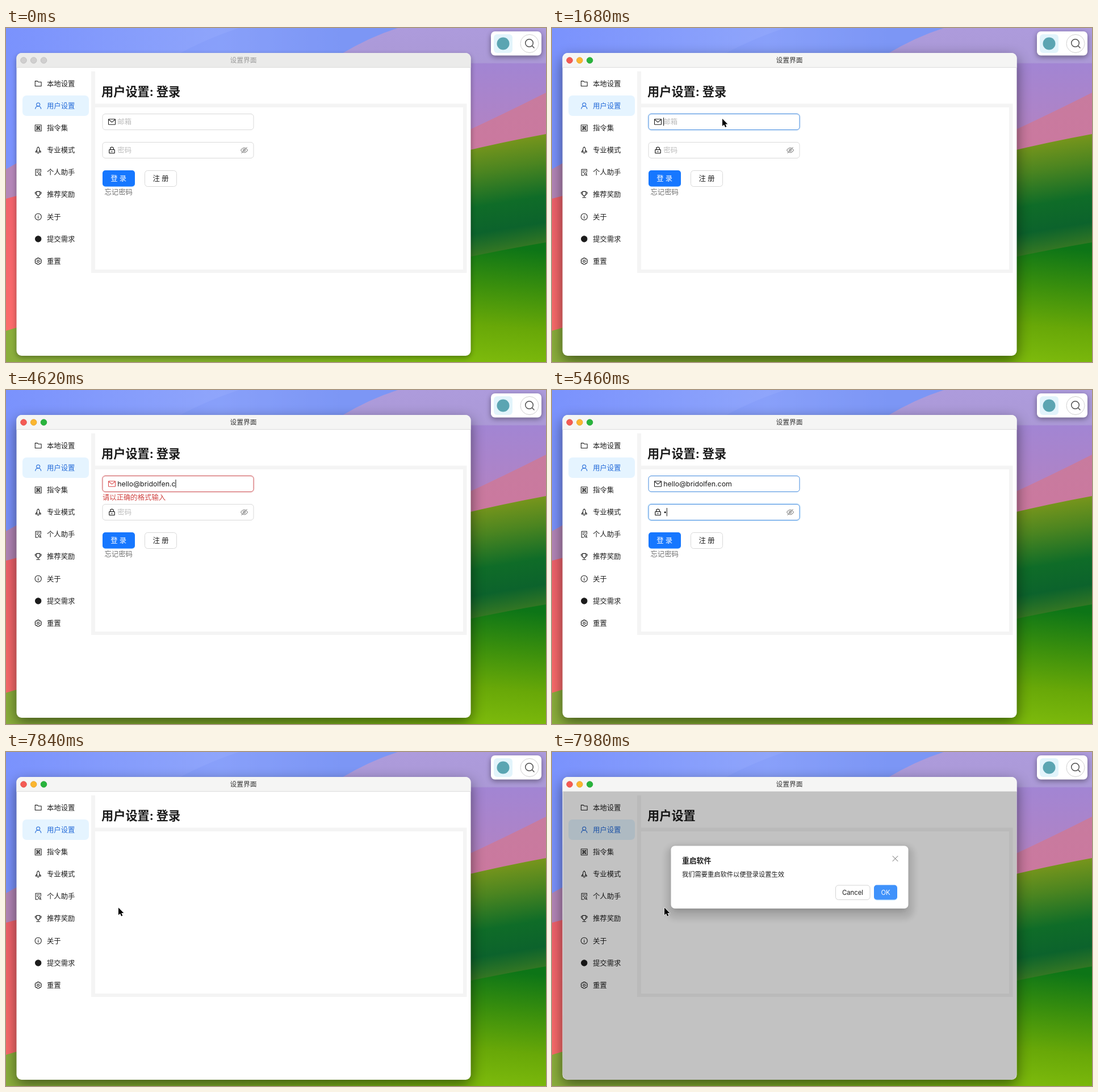
An HTML page for the animation above (8 s loop, 951 by 589 pixels).

```html
<!DOCTYPE html>
<html lang="zh-CN">
<head>
<meta charset="utf-8">
<title>用户设置</title>
<style>
html, body { margin: 0; width: 100%; height: 100%; overflow: hidden; background: #fff; }
svg { display: block; width: 100vw; height: 100vh; }
text { font: 12.35px Inter, "Noto Sans CJK SC", "Noto Sans CJK", sans-serif; fill: #1c1c1c; white-space: pre; }
.mid { text-anchor: middle; }
.line { fill: none; stroke: currentColor; stroke-width: 1.05; stroke-linecap: round; stroke-linejoin: round; }
.hint { fill: #bcbcbc; }
</style>
</head>
<body>
<svg id="stage" viewBox="0 0 951 589" preserveAspectRatio="none">
  <defs>
    <linearGradient id="sky"><stop offset="0" stop-color="#7a92fd"/><stop offset=".4" stop-color="#8fa5fb"/><stop offset=".62" stop-color="#7c96f4"/></linearGradient>
    <linearGradient id="mauve" x2="0" y2="1"><stop offset="0" stop-color="#ad9bdc"/><stop offset=".34" stop-color="#ab99d6"/><stop offset=".35" stop-color="#a285d3"/><stop offset="1" stop-color="#b183c4"/></linearGradient>
    <linearGradient id="pink" x2="0" y2="1"><stop offset="0" stop-color="#c87b9e"/><stop offset="1" stop-color="#cb789f"/></linearGradient>
    <linearGradient id="hill" gradientUnits="userSpaceOnUse" x1="868" y1="198" x2="900" y2="395"><stop offset="0" stop-color="#79961c"/><stop offset=".25" stop-color="#4c8520"/><stop offset=".55" stop-color="#0f6c28"/><stop offset=".78" stop-color="#0c632c"/><stop offset="1" stop-color="#3b7a22"/></linearGradient>
    <linearGradient id="grass" gradientUnits="userSpaceOnUse" x1="900" y1="388" x2="880" y2="589"><stop offset="0" stop-color="#0d7517"/><stop offset=".35" stop-color="#3a8f0d"/><stop offset=".7" stop-color="#68a808"/><stop offset="1" stop-color="#7cb90c"/></linearGradient>
    <linearGradient id="floor"><stop offset="0" stop-color="#8bae3c"/><stop offset=".5" stop-color="#7fae28"/><stop offset="1" stop-color="#7ab90c"/></linearGradient>
    <linearGradient id="coral" x2="0" y2="1"><stop offset="0" stop-color="#f0626c"/><stop offset="1" stop-color="#fb6c6b"/></linearGradient>
    <filter id="soft" x="-20%" y="-20%" width="140%" height="140%"><feGaussianBlur stdDeviation="5"/></filter>
    <filter id="wide" x="-20%" y="-20%" width="140%" height="140%"><feGaussianBlur stdDeviation="12"/></filter>
  </defs>

  <g id="wallpaper">
    <rect width="951" height="589" fill="url(#sky)"/>
    <path d="M300 48Q350 20 410 0H690L590 48Z" fill="#7b95f5" opacity=".35"/>
    <path d="M590 46Q640 16 690 0H951V180H590Z" fill="url(#mauve)"/>
    <path d="M800 187Q880 150 951 114V230H800Z" fill="url(#pink)"/>
    <path d="M800 219Q880 200 951 187V420H800Z" fill="url(#hill)"/>
    <path d="M800 407Q880 390 951 378V589H800Z" fill="url(#grass)"/>
    <path d="M0 249L30 232V310H0Z" fill="#b486b8"/>
    <path d="M0 301L30 293V540H0Z" fill="url(#coral)"/>
    <path d="M0 534L30 525V576H810V589H0Z" fill="url(#floor)"/>
  </g>

  <rect x="854" y="9" width="89" height="42" rx="7" opacity=".4" filter="url(#soft)"/>
  <rect x="854" y="6" width="89" height="42.5" rx="7" fill="#fff"/>
  <rect x="859" y="11" width="33" height="33" rx="6" fill="#e2f4fb"/>
  <circle cx="875.5" cy="27.5" r="11" fill="#5ba5b2"/>
  <circle cx="922" cy="27.5" r="16" fill="#fff" stroke="#cfcfcf"/>
  <g fill="none" stroke="#505050" stroke-width="1.5" stroke-linecap="round"><circle cx="921.5" cy="26.5" r="6.8"/><path d="M926.5 31.5L930 35"/></g>

  <rect id="dimShade" x="18.5" y="48" width="800" height="533" rx="9" opacity=".35" filter="url(#soft)"/>
  <rect id="deepShade" x="18.5" y="53" width="800" height="533" rx="9" opacity=".5" filter="url(#wide)"/>
  <rect x="18.5" y="44" width="800" height="534" rx="9" fill="#fff"/>
  <path id="bar" d="M18.5 70V53a9 9 0 0 1 9-9h782a9 9 0 0 1 9 9V70Z"/>
  <path d="M18.5 69.5h800" stroke="#dcdcdc"/>
  <g id="lights" stroke-width=".8"></g>
  <text id="caption" class="mid" x="418" y="61" style="font-size:11.8px;font-weight:500">设置界面</text>

  <rect x="29" y="119" width="117" height="36" rx="7" fill="#e5f4ff"/>
  <g id="menu"></g>

  <path d="M150 76.5H157V133.5H811.5V432H150Z" fill="#f4f4f4"/>
  <rect x="157" y="140" width="648" height="286" fill="#fff"/>
  <text id="heading" x="168" y="120.3" style="font-size:21.2px;font-weight:700"></text>

  <g id="form">
    <rect id="mailGlow" x="168.8" y="150.3" width="268.4" height="30.4" rx="6" fill="none" stroke-width="1.8"/>
    <rect id="mailBox" x="170" y="151.5" width="266" height="28" rx="5" fill="#fff"/>
    <g id="mailIcon" class="line" transform="translate(186.5 165.5)"><rect x="-6" y="-4.8" width="12" height="9.6" rx=".6"/><path d="M-5.6-4L0 .6 5.6-4"/></g>
    <text id="mailHint" class="hint" x="196.3" y="170.2">邮箱</text>
    <text id="mail" x="196.3" y="170"></text>
    <text id="error" x="170" style="fill:#d0413f">请以正确的格式输入</text>

    <rect id="passGlow" x="168.8" y="200.3" width="268.4" height="30.4" rx="6" fill="none" stroke="#0591ff" stroke-width="1.8"/>
    <rect id="passBox" x="170" y="201.5" width="266" height="28" rx="5" fill="#fff"/>
    <g class="line" transform="translate(186.5 215.5)"><rect x="-4.7" y="-1" width="9.4" height="6.3" rx=".5"/><path d="M-2.8-1v-2a2.8 2.6 0 0 1 5.6 0v2M0 1.4v1.6"/></g>
    <text id="passHint" class="hint" x="196.3" y="220.2">密码</text>
    <g id="dots"></g>
    <g class="line" color="#858585" transform="translate(419.5 215.5)"><path d="M-6 0Q0-8.6 6 0Q0 8.6-6 0ZM-4.6 5L4.8-5"/><circle r="1.9"/></g>
    <path id="caret" stroke="#111"/>

    <rect x="170" y="253" width="57" height="28" rx="5" fill="#0591ff" opacity=".12"/>
    <rect id="login" x="170" y="251" width="57" height="28.5" rx="5"/>
    <text class="mid" x="198.2" y="270" style="fill:#fff;font-weight:500">登 录</text>
    <rect x="244.5" y="251.5" width="56" height="28" rx="5" fill="#fff" stroke="#d9d9d9"/>
    <text class="mid" x="272.5" y="270">注 册</text>
    <text x="173.5" y="294.2" style="fill:#707070">忘记密码</text>
  </g>

  <path id="mask" d="M19.5 70H818V569a9 9 0 0 1-9 9H28a9 9 0 0 1-9-9Z"/>
  <g id="modal">
    <rect x="200" y="164" width="438" height="131" rx="18" opacity=".1" filter="url(#soft)"/>
    <rect x="212" y="170" width="413" height="111" rx="8" opacity=".16" filter="url(#soft)"/>
    <rect x="209.5" y="165.5" width="418" height="110.5" rx="7" fill="#fff"/>
    <text x="229" y="196" style="font-size:12.8px;font-weight:600">重启软件</text>
    <text x="229" y="220.3" style="font-size:11.25px">我们需要重启软件以便登录设置生效</text>
    <path d="M600 183.5l9 9m0-9l-9 9" class="line" color="#858585"/>
    <rect x="499.5" y="235" width="60.5" height="25.5" rx="5" fill="#fff" stroke="#d4d4d4"/>
    <text class="mid" x="529.5" y="251.6" style="font-size:11.3px">Cancel</text>
    <rect x="567" y="236.5" width="41" height="25.5" rx="5" fill="#0591ff" opacity=".15"/>
    <rect x="567" y="234.5" width="41" height="26" rx="5" fill="#4092fb"/>
    <text class="mid" x="587.5" y="251.6" style="font-size:11.3px;fill:#fff">OK</text>
  </g>

  <path id="cursor" d="M0 0V13L3 10.3 5.1 15 7.3 14 5.2 9.5H9.3Z" stroke="#fff" stroke-width="1.2" paint-order="stroke" stroke-linejoin="round"/>
</svg>
<script>
const LOOP = 8000, STEP = 70;
const $ = id => document.getElementById(id);
const GREY = [217, 217, 217], BLUE = [64, 137, 222], RED = [205, 80, 84], INK = [28, 28, 28];

const MENU = [
  ['本地设置', '<path d="M-5.4-4.4h4l1.5 1.6h5.3v7.2H-5.4z"/>'],
  ['用户设置', '<circle cy="-2.2" r="3"/><path d="M-5 5.4a5 4.8 0 0 1 10 0"/>'],
  ['指令集', '<rect x="-5.4" y="-5.4" width="10.8" height="10.8"/><path d="M-1.2-1.2h2.4v2.4h-2.4z"/>' +
    [[-2.1, -2.1], [2.1, -2.1], [-2.1, 2.1], [2.1, 2.1]].map(([x, y]) => `<circle cx="${x}" cy="${y}" r="1"/>`).join('')],
  ['专业模式', '<path d="M-2.2 3.5v-5c0-2 1-3.5 2.2-4.2 1.2.7 2.2 2.2 2.2 4.2v5zM-2.2 0L-4.5 2.4V3.6h2.3M2.2 0L4.5 2.4V3.6H2.2M-1.2 5.5h2.4"/>'],
  ['个人助手', '<path d="M-.6 5.4h-4v-10.8h9.2v4.8M-2.4-2.6h4.8M-2.4 0h1.8M3.8 4.2L5 5.6"/><circle cx="2.4" cy="2.6" r="1.9"/>'],
  ['推荐奖励', '<path d="M-3-5.4h6v4.4a3 3 0 0 1-6 0zM-3-4h-2.3v1.4a2 2 0 0 0 2.3 2M3-4h2.3v1.4a2 2 0 0 1-2.3 2M0 2v3M-3 5.3h6"/>'],
  ['关于', '<circle r="5.6"/><path d="M0-.8v3.6M0-2.9v.1"/>'],
  ['提交需求', '<circle r="5.2" fill="currentColor"/>'],
  ['重置', '<path d="M-1.6-5.6h3.2l.6 1.8 1.9-.4 1.6 2.8-1.3 1.4 1.3 1.4-1.6 2.8-1.9-.4-.6 1.8h-3.2l-.6-1.8-1.9.4-1.6-2.8 1.3-1.4-1.3-1.4 1.6-2.8 1.9.4z"/><circle r="1.9"/>']
];
$('menu').innerHTML = MENU.map(([label, icon], i) => {
  const y = 98 + i * 39.15, color = i === 1 ? '#2068d8' : '#1c1c1c';
  return `<g class="line" color="${color}" transform="translate(56.7 ${y})">${icon}</g>` +
    `<text x="72" y="${y + 4.6}" style="fill:${color}">${label}</text>`;
}).join('');
$('lights').innerHTML = [31, 48.7, 66.5].map(x => `<circle cx="${x}" cy="57" r="5.3"/>`).join('');

const MAIL = 'hello@bridolfen.com';
const MAIL_KEYS = [2030, 2170, 2310, 2450, 2590, 2940, 3150, 3290, 3430, 3570,
  3780, 3920, 4130, 4270, 4340, 4480, 4620, 4830, 4970];
const PASS_KEYS = [5460, 5530, 5600, 5880, 6020, 6160, 6230, 6440];
const PITCH = 5.7;
$('dots').innerHTML = PASS_KEYS.map((_, i) => `<circle cx="${199.2 + i * PITCH}" cy="215.8" r="1.45"/>`).join('');

// time, x, y of the pointer tip
const PATH = [[70, 85, 580], [420, 215, 430], [630, 215, 430], [840, 278, 240], [1050, 300, 160], [6580, 300, 160],
  [6650, 288, 172], [6720, 261, 193], [6860, 226, 237], [7000, 205, 265], [7140, 198, 274.5]];

const clamp = v => Math.max(0, Math.min(1, v));
const ramp = (t, start, span = 210) => clamp((t - start + STEP) / span);
const mix = (a, b, k) => a.map((v, i) => v + (b[i] - v) * k);
const rgb = c => `rgb(${c.map(Math.round)})`;
const count = (keys, t) => keys.filter(k => k <= t).length;
const set = (id, attrs) => { for (const k in attrs) $(id).setAttribute(k, attrs[k]); };
const show = (id, on) => set(id, { visibility: on ? 'inherit' : 'hidden' });

function pointer(t) {
  let i = 0;
  while (i < PATH.length - 2 && t > PATH[i + 1][0]) i++;
  const [a, b] = [PATH[i], PATH[i + 1]];
  return mix(a, b, clamp((t - a[0]) / (b[0] - a[0]))).slice(1);
}

function drawWindow(t) {
  const active = t >= 1120;
  show('dimShade', !active);
  show('deepShade', active);
  set('bar', { fill: active ? '#f5f5f4' : '#ebebea' });
  $('caption').style.fill = active ? '#333' : '#999';
  const fills = active ? ['#f45b54', '#fbb62f', '#28b43c'] : Array(3).fill('#d0cfcf');
  const rims = active ? ['#dd4d46', '#e0a02a', '#20a032'] : Array(3).fill('#bcbcbc');
  [...$('lights').children].forEach((c, i) => {
    c.setAttribute('fill', fills[i]);
    c.setAttribute('stroke', rims[i]);
  });
  $('heading').textContent = t < 7910 ? '用户设置: 登录' : '用户设置';
}

function drawForm(t) {
  show('form', t < 7700);
  const bad = ramp(t, 2030) * (1 - ramp(t, 4830));
  let edge = mix(GREY, BLUE, ramp(t, 1190));
  edge = mix(edge, RED, bad);
  edge = mix(edge, GREY, ramp(t, 6650));
  set('mailBox', { stroke: rgb(edge) });
  set('mailGlow', { stroke: rgb(edge), opacity: 0.1 * ramp(t, 1330) * (1 - ramp(t, 5110)) });
  set('mailIcon', { color: rgb(mix(INK, [218, 72, 72], bad)) });
  set('error', { opacity: bad, y: 194.2 - 4 * (1 - bad) });

  const typed = count(MAIL_KEYS, t), hidden = count(PASS_KEYS, t);
  $('mail').textContent = MAIL.slice(0, typed);
  show('mailHint', !typed);

  const focus = ramp(t, 5110) * (1 - ramp(t, 7560));
  set('passBox', { stroke: rgb(mix(GREY, BLUE, focus)) });
  set('passGlow', { opacity: 0.12 * focus });
  show('passHint', !hidden);
  [...$('dots').children].forEach((d, i) => d.setAttribute('visibility', i < hidden ? 'inherit' : 'hidden'));

  const inPass = t >= 5110;
  const x = 196.3 + (inPass ? hidden * PITCH : typed ? $('mail').getComputedTextLength() : 0);
  set('caret', { d: `M${x + 0.3} ${inPass ? 208 : 158}v14.5` });
  show('caret', t >= 1330 && t < 7560);

  const hover = mix([22, 119, 255], [64, 150, 255], ramp(t, 6930));
  set('login', { fill: t >= 7560 ? '#0958d9' : rgb(hover) });
}

function drawModal(t) {
  const k = clamp((t - 7840) / 140);
  set('mask', { opacity: 0.24 * k });
  set('modal', {
    opacity: k,
    transform: `translate(418.5 221) scale(${0.4 + 0.6 * k}) translate(-418.5 -221)`
  });
  show('modal', k > 0);
}

function draw(time) {
  const t = Math.floor((time % LOOP) / STEP) * STEP;
  drawWindow(t);
  drawForm(t);
  drawModal(t);
  const [x, y] = pointer(t);
  set('cursor', { transform: `translate(${x} ${y})` });
  show('cursor', t >= 70 && t < 2030 || t >= 6650);
}

const start = performance.now();
function tick() {
  draw(performance.now() - start);
  requestAnimationFrame(tick);
}
tick();
</script>
</body>
</html>
```
